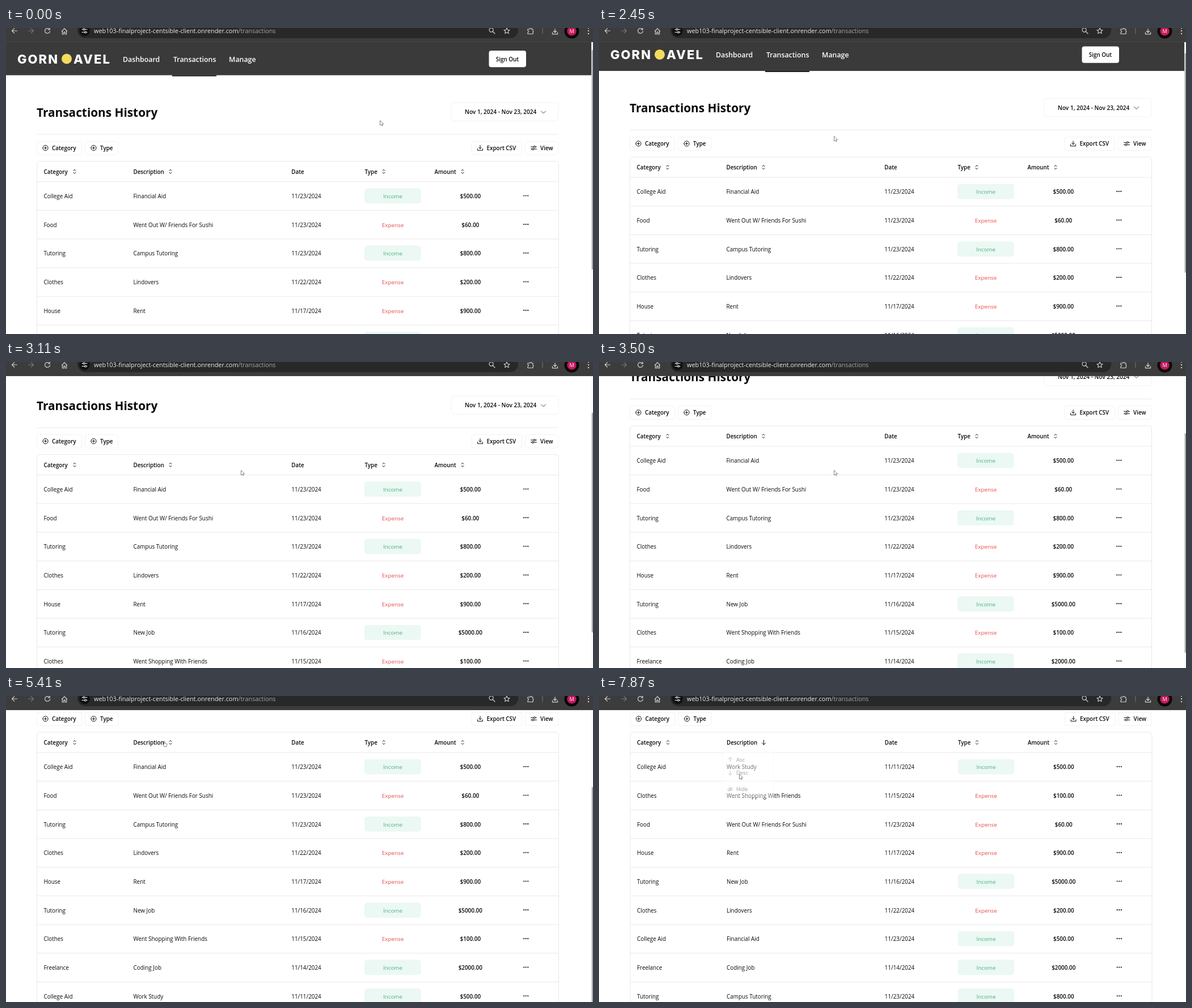
Recreate the animation shown at these times as an HTML page with a canvas. Size 1035 px wide and 541 px high, loop 8 s.

```html
<!DOCTYPE html>
<html lang="en">
<head>
<meta charset="utf-8">
<title>Transactions History</title>
<style>
  html, body { margin: 0; width: 100%; height: 100%; overflow: hidden; background: #fff; }
  canvas { display: block; width: 1035px; height: 541px; }
</style>
</head>
<body>
<canvas id="stage"></canvas>
<script>
const W = 1035, H = 541, LOOP = 8000, BAR = 25, PITCH = 50.68;
const INK = '#0a0a0a', LINE = '#e9e9eb', FAINT = '#f2f2f3', MUTED = '#71717a';
const canvas = document.getElementById('stage');
const ctx = canvas.getContext('2d');
const ratio = window.devicePixelRatio || 1;
canvas.width = W * ratio;
canvas.height = H * ratio;

const rows = [
  ['College Aid', 'Financial Aid', 23, 1, 500],
  ['Food', 'Went Out W/ Friends For Sushi', 23, 0, 60],
  ['Tutoring', 'Campus Tutoring', 23, 1, 800],
  ['Clothes', 'Lindovers', 22, 0, 200],
  ['House', 'Rent', 17, 0, 900],
  ['Tutoring', 'New Job', 16, 1, 5000],
  ['Clothes', 'Went Shopping With Friends', 15, 0, 100],
  ['Freelance', 'Coding Job', 14, 1, 2000],
  ['College Aid', 'Work Study', 11, 1, 500],
];
const sortedRows = [...rows].sort((a, b) => (a[1] < b[1] ? 1 : -1));

// Stepped keys: [time, value...]
const scrollKeys = [
  [0, 0], [2450, 7.6], [2570, 30], [2710, 46], [2860, 50.7],
  [3110, 72], [3230, 95], [3380, 105], [3500, 122.7], [3620, 143], [3740, 152],
  [4250, 153], [4400, 158], [4540, 168], [4660, 171.7],
];
const cursorKeys = [
  [0, 659, 163], [500, 640, 165], [620, 585, 172], [740, 520, 177], [860, 470, 177], [980, 447, 176],
  [1380, 430, 183], [1500, 414, 190], [1640, 414, 191], [4910, 396, 108],
  [5050, 365, 80], [5170, 322, 57], [5290, 292, 66], [5410, 276, 79], [5680, 278, 79],
  [6450, 271, 90], [6570, 258, 112], [6690, 249, 126], [6810, 247, 123],
  [6950, 247, 117], [7090, 247, 114], [7210, 247, 119], [7350, 247, 130], [7470, 247, 138],
];
const menuKeys = [[0, 0, 1], [5680, 0.85, 0.99], [5830, 1, 1], [7870, 0.4, 0.96]];

const at = (keys, t) => keys.filter(k => k[0] <= t).pop().slice(1);

function text(str, x, y, { size = 9.9, weight = 400, color = INK, align = 'left', family = '"Open Sans"' } = {}) {
  ctx.font = `${weight} ${size}px ${family}, sans-serif`;
  ctx.fillStyle = color;
  ctx.textAlign = align;
  ctx.fillText(str, x, y);
}

const strong = (str, x, y, more) => text(str, x, y, { weight: 600, ...more });

function box(x, y, w, h, r, fill, stroke) {
  ctx.beginPath();
  ctx.roundRect(x, y, w, h, r);
  if (fill) { ctx.fillStyle = fill; ctx.fill(); }
  if (stroke) { ctx.strokeStyle = stroke; ctx.lineWidth = 1; ctx.stroke(); }
}

function disc(x, y, r, fill) {
  ctx.beginPath();
  ctx.arc(x, y, r, 0, 7);
  ctx.fillStyle = fill;
  ctx.fill();
}

// Strokes an SVG path around a centre point.
function icon(d, x, y, color = INK, width = 1) {
  ctx.save();
  ctx.translate(x, y);
  ctx.strokeStyle = color;
  ctx.lineWidth = width;
  ctx.lineCap = ctx.lineJoin = 'round';
  ctx.stroke(new Path2D(d));
  ctx.restore();
}

const shapes = {
  left: 'M4.5 0H-4.5M-.3 -4.2L-4.5 0L-.3 4.2',
  right: 'M-4.5 0H4.5M.3 -4.2L4.5 0L.3 4.2',
  reload: 'M3.2 -3A4.4 4.4 0 1 0 4.4 .6M4.2 -5V-2H1.2',
  home: 'M-4.5 -.5L0 -5L4.5 -.5M-3.6 -1V5H-1.2V1.2H1.2V5H3.6V-1',
  tune: 'M-4.5 -2.5H-2.5M.5 -2.5H4.5M-4.5 2.5H0M3 2.5H4.5M-2.5 -2.5a1.5 1.5 0 1 0 3 0a1.5 1.5 0 1 0 -3 0M0 2.5a1.5 1.5 0 1 0 3 0a1.5 1.5 0 1 0 -3 0',
  search: 'M-5 -1.5a3.6 3.6 0 1 0 7.2 0a3.6 3.6 0 1 0 -7.2 0M1.5 1.5L5 5',
  star: 'M0 -5L1.5 -1.7L5 -1.4L2.4 1L3.2 4.6L0 2.7L-3.2 4.6L-2.4 1L-5 -1.4L-1.5 -1.7Z',
  puzzle: 'M-5 -3H-1.5A1.8 1.8 0 0 1 2 -3H4V0A1.8 1.8 0 0 1 4 3V5.5H-5V3A1.8 1.8 0 0 0 -5 -.5Z',
  download: 'M0 -4.5V1.5M-2.5 -1L0 1.5L2.5 -1M-4.5 1.5V4.3H4.5V1.5',
  plus: 'M-4.6 0a4.6 4.6 0 1 0 9.2 0a4.6 4.6 0 1 0 -9.2 0M-2.2 0H2.2M0 -2.2V2.2',
  sliders: 'M-5 -2H-.3M3 -2H5M-5 2H-3M.3 2H5M-.3 -2a1.6 1.6 0 1 0 3.2 0a1.6 1.6 0 1 0 -3.2 0M-3 2a1.6 1.6 0 1 0 3.2 0a1.6 1.6 0 1 0 -3.2 0',
  chevron: 'M-4 -2L0 2L4 -2',
  sort: 'M-2 -1.5L0 -3.5L2 -1.5M-2 1.5L0 3.5L2 1.5',
  up: 'M0 4V-4M-3.2 -.8L0 -4L3.2 -.8',
  down: 'M0 -4V4M-3.2 .8L0 4L3.2 .8',
  hide: 'M-4.8 0Q0 -6 4.8 0Q0 6 -4.8 0M-1.4 0a1.4 1.4 0 1 0 2.8 0a1.4 1.4 0 1 0 -2.8 0M-4 4L4 -4',
};

function browserBar() {
  ctx.fillStyle = '#3c3c3c';
  ctx.fillRect(0, 0, W, BAR);
  ctx.fillStyle = '#474747';
  ctx.fillRect(0, BAR - 1, W, 1);
  box(126, -14, 777, 32, 14, '#282828');
  const light = '#d0d0d0';
  icon(shapes.left, 15, 5, light, 1.2);
  icon(shapes.right, 44, 5, '#777', 1.2);
  icon(shapes.reload, 73, 5, light, 1.2);
  icon(shapes.home, 103, 6, light, 1.2);
  disc(138.5, 5, 9.5, '#111');
  icon(shapes.tune, 138.5, 5, '#eee', 1.2);
  const host = 'web103-finalproject-centsible-client.onrender.com';
  text(host, 155, 9, { size: 10.85, color: '#f0f0f0' });
  text('/transactions', 155 + ctx.measureText(host).width, 9, { size: 10.85, color: '#a8a8a8' });
  icon(shapes.search, 857, 5, light, 1.2);
  icon(shapes.star, 883, 5, light, 1.1);
  icon(shapes.puzzle, 925, 5, light, 1.2);
  icon('M0 -5V5', 946, 5, '#777');
  icon(shapes.download, 968, 6.5, light, 1.3);
  disc(997.5, 5.5, 13, '#080808');
  disc(997.5, 5.5, 8.2, '#c2185b');
  text('M', 997.5, 9, { size: 9, color: '#fff', align: 'center' });
  [0, 5, 10].forEach(y => disc(1027, y, 1.2, light));
}

function navigation() {
  ctx.fillStyle = '#3a3a3a';
  ctx.fillRect(-1, BAR, W + 1, 58.5);
  ctx.letterSpacing = '2px';
  const brand = { size: 22, weight: 800, color: '#fff', family: 'Inter' };
  text('GORN', 20, 63, brand);
  text('AVEL', 119, 63, brand);
  ctx.letterSpacing = '0px';
  disc(107, 54.5, 9, '#f3dc5c');
  const link = { size: 12.35, color: '#fff' };
  strong('Dashboard', 206, 59.5, link);
  strong('Transactions', 295, 59.5, link);
  strong('Manage', 393, 59.5, link);
  ctx.fillStyle = '#000';
  ctx.fillRect(293, 83.5, 78, 1.8);
  box(851.5, 40, 65.5, 29.3, 4, '#fff');
  strong('Sign Out', 884, 59, { align: 'center' });
}

function button(x, w, shape, label, iconX, labelX) {
  box(x, 200.5, w, 23.5, 4, '#fff', FAINT);
  icon(shape, iconX, 212);
  strong(label, labelX, 216);
}

function rule(y) {
  ctx.fillStyle = LINE;
  ctx.fillRect(54.5, y - 0.5, 920, 1);
}

function tableRow([category, description, day, income, amount], i) {
  const y = 297 + i * PITCH, base = y + 4;
  text(category, 66.5, base);
  text(description, 224.5, base);
  text(`11/${day}/2024`, 503.3, base);
  if (income) box(632, y - 13.5, 99.7, 26.7, 5, '#ebf8f3');
  text(income ? 'Income' : 'Expense', 682, base, { size: 9.8, align: 'center', color: income ? '#48b07f' : '#e84b4b' });
  strong(`$${amount}.00`, 818.8, base, { align: 'center' });
  [-3.5, 0, 3.5].forEach(dx => disc(916.8 + dx, y - 0.5, 1.1, INK));
  rule(y + PITCH / 2);
}

function page(sorted) {
  navigation();
  strong('Transactions History', 54, 157, { size: 20.8, weight: 700 });
  box(785, 132, 189, 32.5, 5, '#fff', FAINT);
  strong('Nov 1, 2024 - Nov 23, 2024', 809, 152.3, { size: 10.1 });
  icon(shapes.chevron, 947.5, 149, '#444');
  rule(188);
  button(54.5, 79, shapes.plus, 'Category', 69.5, 81);
  button(139.5, 58.5, shapes.plus, 'Type', 154.5, 166);
  button(821, 88.5, shapes.download, 'Export CSV', 836, 847.5);
  button(915.5, 58.5, shapes.sliders, 'View', 930.5, 942);

  box(54.5, 235.7, 920, 36 + 10 * PITCH, 5, null, LINE);
  const heads = [['Category', 66.5, 121], ['Description', 224.5, 290], ['Date', 503.3],
    ['Type', 632.5, 666], ['Amount', 755.5, 805]];
  for (const [label, x, iconX] of heads) {
    strong(label, x, 258, { size: 9.8 });
    if (iconX) icon(sorted && label === 'Description' ? shapes.down : shapes.sort, iconX, 253.8);
  }
  rule(271.6);
  (sorted ? sortedRows : rows).forEach(tableRow);
}

function scrollbar(scroll) {
  ctx.fillStyle = '#f8f8f8';
  ctx.fillRect(1032, BAR, 3, H);
  box(1032.7, 39 + 0.71 * scroll, 3, 388, 1, '#a8a8a8');
}

function menu([opacity, scale]) {
  if (!opacity) return;
  ctx.save();
  ctx.globalAlpha = opacity;
  ctx.translate(263, 97);
  ctx.scale(scale, scale);
  box(-46.5, 0, 93, 85.5, 4, '#fff', FAINT);
  const items = [['up', 'Asc', 16.3], ['down', 'Desc', 40.5], ['hide', 'Hide', 70.8]];
  for (const [shape, label, y] of items) {
    icon(shapes[shape], -33, y, MUTED);
    text(label, -22, y + 3.6);
  }
  ctx.fillStyle = FAINT;
  ctx.fillRect(-46, 55.5, 92, 0.8);
  ctx.restore();
}

function cursor(x, y, hand) {
  const arrow = 'M.5 .5V9L2.6 7.3L4 10L5.2 9.4L4 6.8L6.6 6.5Z';
  const pointer = 'M2.5 7V1.2Q3.2 .2 4 1.2V4.5L7.3 5.3Q8 5.6 7.8 7L7 10.5H3L.6 7.2Q.8 5.8 2.5 7Z';
  const path = new Path2D(hand ? pointer : arrow);
  ctx.save();
  ctx.translate(x, y);
  ctx.fillStyle = '#fff';
  ctx.fill(path);
  ctx.strokeStyle = '#666';
  ctx.lineWidth = 0.8;
  ctx.stroke(path);
  ctx.restore();
}

function draw(t) {
  const [scroll] = at(scrollKeys, t);
  const menuOpen = t >= 5680;
  ctx.setTransform(ratio, 0, 0, ratio, 0, 0);
  ctx.fillStyle = '#fff';
  ctx.fillRect(0, 0, W, H);
  ctx.save();
  ctx.translate(menuOpen ? 0.5 : 0, -scroll);
  page(t >= 7870);
  ctx.restore();
  if (!menuOpen) scrollbar(scroll);
  menu(at(menuKeys, t));
  browserBar();
  cursor(...at(cursorKeys, t), t >= 5410 && !menuOpen);
}

const start = performance.now();
function tick() {
  draw((performance.now() - start) % LOOP);
  requestAnimationFrame(tick);
}
tick();
</script>
</body>
</html>
```
